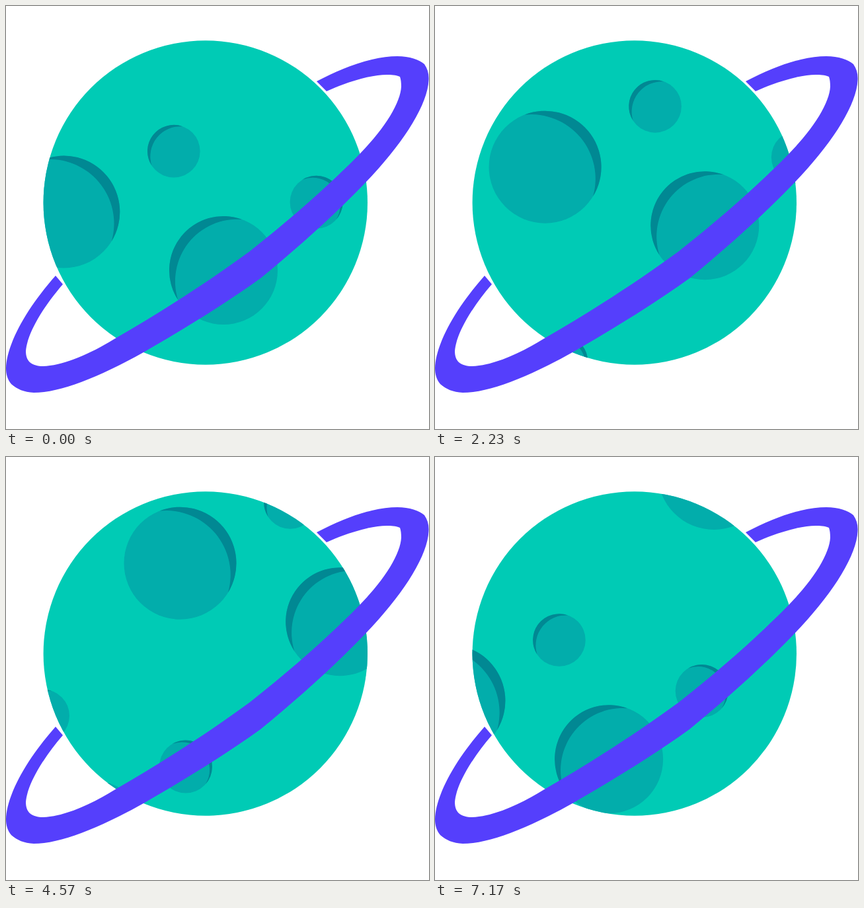
Write an HTML page that moves like this. It is 640 by 640 pixels and loops after 7210 ms.

```html
<!DOCTYPE html>
<html lang="en">
<head>
<meta charset="utf-8">
<title>Ringed planet</title>
<style>
  html, body { margin: 0; width: 100%; height: 100%; overflow: hidden; background: #fff; }
  svg { display: block; width: 100%; height: 100%; }
</style>
</head>
<body>
<svg viewBox="0 0 640 640">
  <defs>
    <clipPath id="disc"><circle cx="301.8" cy="297.5" r="245.2"/></clipPath>
  </defs>
  <circle cx="301.8" cy="297.5" r="245.2" fill="#00cbb5"/>
  <g id="surface" clip-path="url(#disc)"></g>
  <path fill="#553ffc" d="
    M470 114 C520 88 560 76 592 76 C611 76 625 81 633 88
    C638 95 640 103 639.5 112 C638 150 600 209 545 266
    C500 313 445 363 385 412 C325 455 265 491 208 524
    C140 562 82 585 42 585 C27 584 17 580 8 572
    C2 565 0 556 0 548 C1 512 30 459 75 408
    L86 421 C55 457 32 496 30 522 C30 530 32 535 36 539
    C41 543 48 545 56 545 C86 544 125 528 167 502
    C233 464 305 418 369 371 C436 318 489 271 536 223
    C575 183 597 145 598 122 C598 116 597.5 111 596 107
    C589 104 583 104 576 104 C555 104 523 112 485 129 Z"/>
</svg>
<script>
  const LOOP = 7210;       // ms
  const SAMPLE = 100 / 3;  // ms per displayed picture
  const HALF = 47;         // steps from the edge to the middle position

  // Shade: angle it faces, chord distance and inner radius relative to r.
  const craters = [
    { x: 253.8, y: 219.7, r: 39.8, angle: 218.5, chord: 0.317, inner: 1.145 },
    { x: 87.3, y: 311.5, r: 85, angle: -40, chord: 0.317, inner: 1.145 },
    { x: 329, y: 400, r: 82, angle: 218.5, chord: 0.317, inner: 1.145 },
    { x: 469.6, y: 296.7, r: 40, angle: -40, chord: 0.14, inner: 1.04 }
  ];

  const surface = document.getElementById('surface');

  function add(parent, tag, attrs) {
    const el = document.createElementNS('http://www.w3.org/2000/svg', tag);
    for (const key in attrs) el.setAttribute(key, attrs[key]);
    return parent.appendChild(el);
  }

  function makeGroup() {
    const group = add(surface, 'g', {});
    for (const { x, y, r, angle, chord, inner } of craters) {
      const h = r * chord;
      const s = Math.sqrt(r * r - h * h);
      const R = r * inner;
      add(group, 'circle', { cx: x, cy: y, r, fill: '#02adab' });
      add(group, 'path', {
        fill: '#018893',
        transform: `translate(${x} ${y}) rotate(${angle})`,
        d: `M${h} ${-s} A${r} ${r} 0 0 1 ${h} ${s} A${R} ${R} 0 0 0 ${h} ${-s}Z`
      });
    }
    return group;
  }

  const groups = [makeGroup(), makeGroup()];

  // Steps run at 25 per second, sampled 30 times per second.
  function stepAt(t) {
    const tick = Math.floor(t / 10) * 10;
    const sample = Math.floor((tick + 5) / SAMPLE);
    return Math.ceil(sample * 5 / 6 - 0.5 - 1e-6);
  }

  // Drift is faster on the way out than on the way in.
  function place(group, step) {
    let u = step % (2 * HALF);
    if (u > HALF) u -= 2 * HALF;
    const [vx, vy] = u < 0 ? [7.32, 6.365] : [8.81, 7.54];
    group.setAttribute('transform', `translate(${u * vx} ${-u * vy})`);
  }

  function draw(now) {
    const step = stepAt((now - start) % LOOP);
    groups.forEach((group, i) => place(group, step + i * HALF));
  }

  function frame() {
    draw(performance.now());
    requestAnimationFrame(frame);
  }

  const start = performance.now();
  frame();
</script>
</body>
</html>
```
